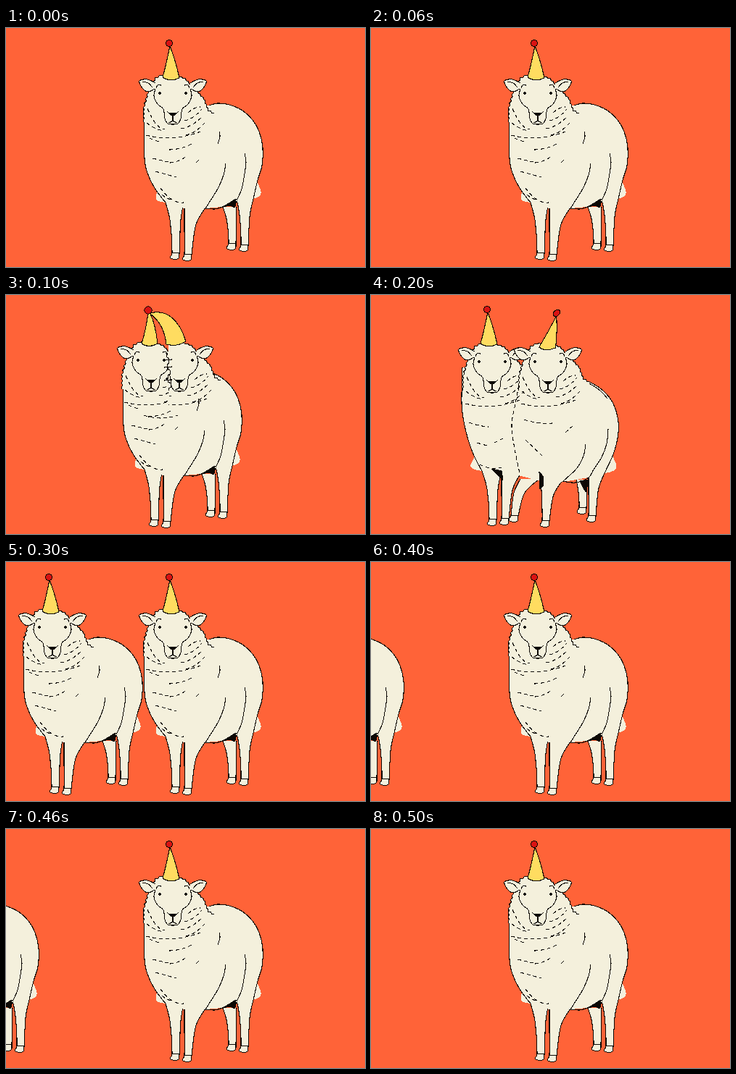
Recreate the animation shown at these times as an HTML page. Size 495 by 330 pixels, loop 0.6 s.

```html
<!DOCTYPE html>
<html lang="en">
<head>
<meta charset="utf-8">
<title>Party sheep</title>
<style>
  html, body { margin: 0; width: 100%; height: 100%; overflow: hidden; background: #ff6338; }
  svg { display: block; width: 100%; height: 100%; }
  path, circle { stroke: #0c0804; stroke-width: 1.1; stroke-linejoin: round; shape-rendering: crispEdges; }
  .bare { stroke: none; }
  .dash { stroke-dasharray: 5 4; }
</style>
</head>
<body>
<svg viewBox="0 0 495 330">
  <defs>
    <clipPath id="west"><path d="M0 0H224V330H0Z"/></clipPath>
    <clipPath id="east"><path d="M224 0H495V330H224Z"/></clipPath>
    <g id="half"/><g id="head"/><g id="hat"/><g id="body"/><g id="merged"/><g id="pair"/>
  </defs>
  <g id="stage"/>
</svg>
<script>
const WOOL = '#f4f0dc', HAT = '#ffdc60', RED = '#d91212', INK = '#0c0804';
const el = id => document.getElementById(id);
const mix = (a, b, t) => a + (b - a) * t;
const put = (id, markup) => { el(id).innerHTML += markup; };
const use = (id, move = '') => `<use href="#${id}" transform="${move}"/>`;
const shift = (id, x, y = 0) => use(id, `translate(${x} ${y})`);

const parse = text => text.trim().split(/\s+/).map(pair => pair.split(',').map(Number));

// Catmull-Rom curve through the points
function curve(p) {
  let d = 'M' + p[0];
  for (let i = 0; i < p.length - 1; i++) {
    const a = p[i - 1] || p[i], b = p[i], c = p[i + 1], e = p[i + 2] || c;
    const ctrl = (q, r, s, k) => [q[0] + k * (s[0] - r[0]) / 6, q[1] + k * (s[1] - r[1]) / 6];
    d += `C${ctrl(b, a, c, 1)} ${ctrl(c, b, e, -1)} ${c}`;
  }
  return d;
}

// Adds small curls along a line
function curl(p) {
  const out = [p[0]];
  let side = 0.8;
  for (let i = 1; i < p.length; i++) {
    const [x, y] = p[i - 1], dx = p[i][0] - x, dy = p[i][1] - y, len = Math.hypot(dx, dy);
    const steps = Math.max(1, Math.round(len / 3));
    for (let k = 1; k <= steps; k++, side = -side)
      out.push([x + dx * k / steps + side * dy / len, y + dy * k / steps - side * dx / len]);
  }
  return out;
}

const path = (id, d, fill = 'none', cls = '') => put(id, `<path d="${d}" fill="${fill}" class="${cls}"/>`);
const line = (id, pts, fill, cls) => path(id, curve(parse(pts)), fill, cls);
const fur = (id, pts, fill = WOOL) => path(id, curve(curl(parse(pts))), fill);
const dot = (id, x, y, r, fill) => put(id, `<circle cx="${x}" cy="${y}" r="${r}" fill="${fill}"/>`);
// Broken crease that sags between two ends
const crease = (id, x1, y1, x2, y2, sag) =>
  path(id, `M${x1} ${y1}Q${(x1 + x2) / 2} ${(y1 + y2) / 2 + sag * 2} ${x2} ${y2}`, 'none', 'dash');

// Leg from a top edge a..b at height y to a foot centred on x, ending at f
function leg(id, a, b, y, x, f) {
  const ankle = f - 10, knee = mix(y, f, 0.33), l = x - 5, r = x + 5;
  path(id, curve([[a, y], [mix(a, l, 0.7), knee], [l, ankle], [x - 8, f - 3], [x - 4, f],
    [x + 4, f - 1], [r, ankle + 2], [mix(b, r, 0.7), knee], [b, y]]), WOOL);
  path(id, `M${l} ${ankle + 1}L${r} ${ankle + 2}`);
}

function torso(id, back, side) {
  line(id, back + ' ' + side, WOOL, 'bare');
  line(id, back);
  line(id, side);
}

// Half a face, mirrored to make the other half
line('half', '206,76 195,71 184,73 188,83 196,88 205,84', WOOL);
line('half', '188,74 196,76 202,82');
line('half', '206,84 204,94 209,105 217,112 219,125 223,132 230,133');
line('half', '207,83 209,79 214,79');
line('half', '222,115 226,119 230,122 230,128 224,131');
path('half', 'M225 117L230 118V122Z', INK);
dot('half', 212, 90, 1.4, INK);

fur('head', '190,130 190,110 196,89 206,69 215,65 236,66 247,70 265,89 273,98 279,114 287,118');
put('head', use('half') + use('half', 'matrix(-1 0 0 1 460 0)'));
crease('head', 195, 111, 219, 140, 7);
crease('head', 194, 131, 218, 142, 2);
crease('head', 193, 148, 268, 143, 6);
crease('head', 241, 139, 270, 123, 3);
crease('head', 246, 128, 270, 112, 3);
crease('head', 248, 148, 274, 131, 3);
crease('head', 251, 117, 268, 109, -2);

path('hat', 'M226 25Q221 50 216 68Q226 75 239 69Q234 45 226 25Z', HAT);
dot('hat', 225, 21, 4.6, RED);

line('body', '297,248 306,243 317,235 315,248 309,245 297,248', INK);
leg('body', 299, 318, 247, 312, 306);
leg('body', 318, 341, 236, 329, 308);
path('body', 'M298 247L317 235L315 248L310 245Z', INK);
leg('body', 220, 245, 241, 234, 319);
leg('body', 246, 275, 248, 251, 321);
torso('body', '280,107 292,104 308,106 326,114 340,127 349,143 354,165 353,190 347,210 341,236',
  '220,241 207,224 197,205 191,180 190,110');
path('body', 'M318 236L298 247L275 249L246 249L220 241L260 190Z', WOOL, 'bare');
line('body', '275,249 288,250 298,247 312,240 318,236');
path('body', 'M299 247L317 236L315 247L310 244Z', INK);
line('body', '294,143 295,150 292,160');
line('body', '303,187 300,203 293,220 284,235 275,249');
line('body', '329,173 331,185 329,201 325,222 318,238');
crease('body', 198, 152, 214, 157, 1);
crease('body', 202, 180, 224, 185, 0);
crease('body', 226, 186, 249, 177, 2);
crease('body', 225, 168, 256, 160, 2);
crease('body', 206, 198, 235, 206, 0);
crease('body', 262, 186, 268, 180, 0);
crease('body', 213, 221, 245, 241, 6);
crease('body', 215, 230, 231, 237, 2);

// Two half heads joined in the middle
put('merged', shift('body', -29)
  + `<g clip-path="url(#west)">${shift('head', -30)}</g>`
  + `<g clip-path="url(#east)">${shift('head', 9)}</g>`);
fur('merged', '220,80 225,91 222,99 227,107 221,116 228,124 224,132', 'none');
for (const y of [90, 100, 118]) path('merged', `M218 ${y}l11 -1`);
path('merged', 'M196 25Q193 48 187 67Q197 74 209 67Q206 40 199 26Z', HAT);
path('merged', 'M199 25C222 19 239 35 248 64Q236 72 221 68Q218 40 199 26Z', HAT);
dot('merged', 196, 21, 5.2, RED);
crease('merged', 190, 166, 237, 166, 4);

// Two sheep pulling apart
leg('pair', 283, 299, 255, 292, 302);
leg('pair', 300, 322, 246, 305, 313);
path('pair', 'M288 257L299 255L296 272Z', INK);
leg('pair', 206, 232, 254, 198, 313);
leg('pair', 234, 264, 256, 241, 320);
leg('pair', 153, 180, 243, 168, 318);
leg('pair', 180, 208, 244, 185, 317);
torso('pair', '290,116 305,122 321,133 334,150 341,175 340,198 334,220 322,246',
  '153,243 142,222 134,200 128,175 125,150 126,100');
path('pair', 'M322 244L300 252L266 258L234 257L207 250L180 244L153 242L220 180Z', WOOL, 'bare');
line('pair', '264,257 282,259 300,252 307,241 318,224 325,205 327,185');
line('pair', '296,206 293,222 284,239 265,257');
line('pair', '301,122 316,132 326,143');
path('pair', 'M166 240L180 243L182 256Z', INK);
path('pair', 'M232 244L237 250V264L233 268Z', INK);
put('pair', shift('head', -63, 2) + shift('head', 14, 2)
  + shift('hat', -65, -1) + use('hat', 'matrix(1 0 -.32 1 37.6 4)'));
line('pair', '204,125 199,150 194,180 198,212 205,246', 'none', 'dash');
crease('pair', 135, 176, 162, 182, 1);
crease('pair', 146, 204, 160, 208, 0);
crease('pair', 170, 204, 182, 198, 0);
crease('pair', 211, 172, 250, 177, 2);
crease('pair', 213, 200, 238, 224, 0);
crease('pair', 268, 190, 278, 181, 0);
crease('pair', 150, 234, 180, 238, 3);

const sheep = (x = 0) => shift('body', x) + shift('head', x) + shift('hat', x);
const scenes = [
  sheep(),
  use('merged'),
  use('pair'),
  sheep(-166) + sheep(),
  sheep(-309) + sheep(),
  sheep()
];

let shown = -1;
function tick() {
  const i = Math.floor(performance.now() / 100) % scenes.length;
  if (i !== shown) el('stage').innerHTML = scenes[shown = i];
  requestAnimationFrame(tick);
}
tick();
</script>
</body>
</html>
```
